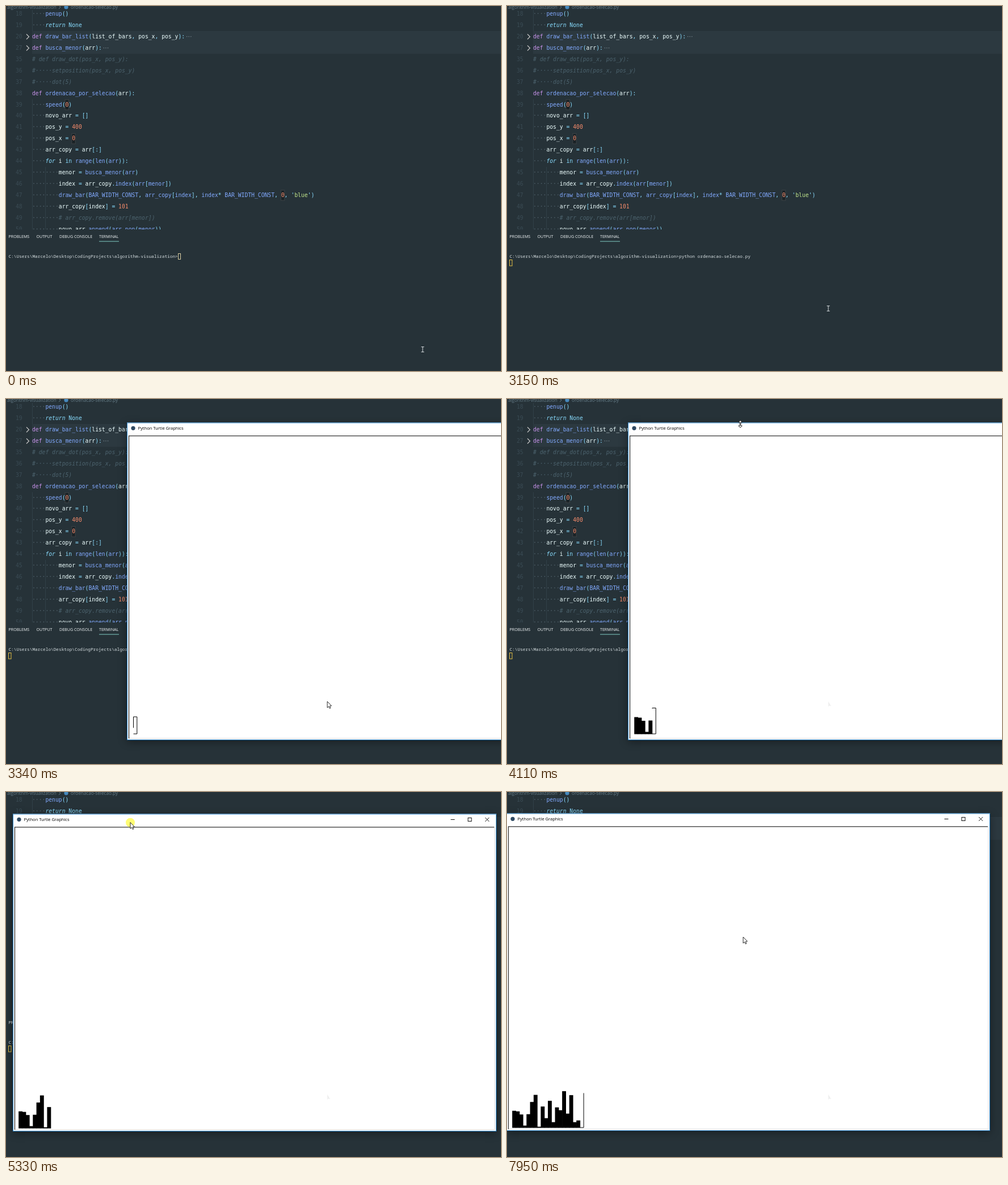
An HTML page with a canvas that plays this animation: 872 px wide and 642 px high, repeating every 8 s.

```html
<!DOCTYPE html>
<html lang="pt">
<head>
<meta charset="utf-8">
<title>Selection sort with turtle</title>
<style>
  html, body { margin: 0; width: 100%; height: 100%; overflow: hidden; background: #263238; }
  canvas { display: block; }
</style>
</head>
<body>
<canvas id="stage" width="872" height="642"></canvas>
<script>
const ctx = document.getElementById('stage').getContext('2d');
const LOOP = 8000;
const CODE_FONT = '9.72px "DejaVu Sans Mono", monospace';
const TERM_FONT = '7.77px "Noto Sans Mono", monospace';
const ui = size => `${size}px "Open Sans", "Noto Sans", sans-serif`;
const BG = '#263238', CYAN = '#89ddff', BLUE = '#82aaff', WHITE = '#eeffff', COMMENT = '#4c636e';
const COL = 5.85, ROW = 19.92, LEFT = 46, TERM_COL = 4.664;

const code = [
  [18, '    penup()'],
  [19, '    return None'],
  [20, 'def draw_bar_list(list_of_bars, pos_x, pos_y):', true],
  [27, 'def busca_menor(arr):', true],
  [35, '# def draw_dot(pos_x, pos_y):'],
  [36, '#     setposition(pos_x, pos_y)'],
  [37, '#     dot(5)'],
  [38, 'def ordenacao_por_selecao(arr):'],
  [39, '    speed(0)'],
  [40, '    novo_arr = []'],
  [41, '    pos_y = 400'],
  [42, '    pos_x = 0'],
  [43, '    arr_copy = arr[:]'],
  [44, '    for i in range(len(arr)):'],
  [45, '        menor = busca_menor(arr)'],
  [46, '        index = arr_copy.index(arr[menor])'],
  [47, "        draw_bar(BAR_WIDTH_CONST, arr_copy[index], index* BAR_WIDTH_CONST, 0, 'blue')"],
  [48, '        arr_copy[index] = 101'],
  [49, '        # arr_copy.remove(arr[menor])'],
  [50, '        novo_arr.append(arr.pop(menor))'],
];
const prompt = 'C:\\Users\\Marcelo\\Desktop\\CodingProjects\\algorithm-visualization>';
const command = 'python ordenacao-selecao.py';
const keyTimes = [900, 1170, 1340, 1410, 1590, 1680, 1770, 1970, 2090];
const TAB_KEY = 2270, ENTER = 3020;

const OPEN = 3200, GRAB = 4665, RELEASE = 6310;
const WIN_W = 852, WIN_H = 558.5;
const windowPath = [
  [GRAB, 213, 41.5], [5070, 4, 30], [5329, 4, 30], [5330, 12, 38.5], [5630, 5, 31], [5760, 5, 31],
  [5940, 1, 37], [6040, 1, 37], [6090, -1, 37.5],
];
const mousePath = [
  [40, 734, 604], [290, 566, 532], [3660, 566, 532], [3850, 538, 430], [4110, 411, 44],
  [4350, 413, 49], [4640, 420, 56.5],
];
const exitPath = [[RELEASE - 50, 206, 52.5], [6600, 290, 130], [7040, 416, 255]];

const BAR_W = 6.28, BAR_TIME = 160;
const heights = [30, 29, 23.5, 4, 24, 45.5, 58, 2, 37.5, 17, 47.5, 10, 36, 31, 64.5, 25, 57.5, 10, 13, 61.5];

const clamp = v => Math.max(0, Math.min(1, v));

function follow(path, t) {
  if (t <= path[0][0]) return path[0].slice(1);
  for (let i = 1; i < path.length; i++) {
    const [t0, x0, y0] = path[i - 1], [t1, x1, y1] = path[i];
    if (t < t1) {
      const k = (t - t0) / (t1 - t0);
      return [x0 + (x1 - x0) * k, y0 + (y1 - y0) * k];
    }
  }
  return path[path.length - 1].slice(1);
}

function text(str, x, y, color, font) {
  if (font) ctx.font = font;
  ctx.fillStyle = color;
  ctx.fillText(str, x, y);
}

function rect(x, y, w, h, color) {
  ctx.fillStyle = color;
  ctx.fillRect(x, y, w, h);
}

function box(x, y, w, h, color) {
  ctx.strokeStyle = color;
  ctx.lineWidth = 1;
  ctx.strokeRect(x, y, w, h);
}

function disc(x, y, r, color) {
  ctx.fillStyle = color;
  ctx.beginPath();
  ctx.arc(x, y, r, 0, 7);
  ctx.fill();
}

function line(points, color, width = 1) {
  ctx.strokeStyle = color;
  ctx.lineWidth = width;
  ctx.beginPath();
  points.forEach(([x, y]) => ctx.lineTo(x, y));
  ctx.stroke();
}

function codeLine(src, y) {
  const isDef = src.startsWith('def');
  const put = (str, col, color, italic) =>
    text(str, LEFT + col * COL, y, color, (italic ? 'italic ' : '') + CODE_FONT);
  let depth = 0;
  for (const m of src.matchAll(/^ +|#.*|'\w*'|\w+|[^\w\s]/g)) {
    const tok = m[0], col = m.index, next = src[col + tok.length];
    if (tok[0] === ' ') put('·'.repeat(tok.length), col, '#53656e');
    else if (tok[0] === '#') put(tok.replace(/ {2,}/, s => '·'.repeat(s.length)), col, COMMENT, true);
    else if (tok[0] === "'") {
      put("'    '", col, CYAN);
      put(tok.slice(1, -1), col + 1, '#c3e88d');
    }
    else if (/^\d/.test(tok)) {
      if (tok === '0') {
        const x = LEFT + col * COL - .5;
        rect(x, y - 12, 6.5, 18, 'rgba(0,0,0,.3)');
        box(x, y - 12, 6.5, 18, '#3c4346');
      }
      put(tok, col, '#f78c6c');
    }
    else if (tok === 'def') put(tok, col, '#c792ea');
    else if (/^(for|return)$/.test(tok)) put(tok, col, CYAN, true);
    else if (/^(in|None)$/.test(tok) || /\W/.test(tok)) put(tok, col, CYAN);
    else put(tok, col, next === '(' || (depth && !isDef) ? BLUE : WHITE);
    depth += (tok === '(') - (tok === ')');
  }
}

function drawEditor() {
  rect(0, 0, 872, 642, BG);
  text('algorithm-visualization', 2, 4.8, '#647b86', ui(8.2));
  text('ordenacao-selecao.py', 114, 4.8, '#647b86');
  line([[93, -1], [96, 2], [93, 5]], '#647b86');
  disc(106, 2, 3.6, '#4689bd');

  ctx.save();
  ctx.beginPath();
  ctx.rect(0, 7, 872, 386);
  ctx.clip();
  rect(LEFT, 44, 826, 40, '#2c3940');
  rect(46, 4, 1, 40, '#314048');
  rect(46, 164, 1, 230, '#314048');
  rect(69, 283, 1, 110, '#314048');
  code.forEach(([number, src, folded], i) => {
    const y = 17.2 + i * ROW;
    text(number, 17, y, '#3a4b54', CODE_FONT);
    codeLine(src, y);
    if (!folded) return;
    line([[36, y - 7.5], [40.5, y - 3], [36, y + 1.5]], '#c5c5c5', 1.2);
    for (let d = 0; d < 3; d++) disc(LEFT + src.length * COL + 3.5 + d * 3.6, y - 3.2, .75, '#7a8a92');
  });
  ctx.restore();

  ctx.font = ui(7.1);
  [['PROBLEMS', 4.5], ['OUTPUT', 53.5], ['DEBUG CONSOLE', 94], ['TERMINAL', 164]]
    .forEach(([label, x]) => text(label, x, 408.4, '#f4f8f9'));
  rect(164, 413.5, 35, 1, '#80cbc4');
}

function drawTerminal(t) {
  const typed = t >= TAB_KEY ? command.length : keyTimes.filter(k => t >= k).length;
  text(prompt, 4.5, 442.8, '#d5dde0', TERM_FONT);
  const start = 4.5 + prompt.length * TERM_COL;
  text(command.slice(0, typed), start, 442.8, '#d5dde0');
  const color = t < 50 ? '#d6cba0' : '#e3bf45';
  if (t < ENTER) box(Math.round(start + typed * TERM_COL) + .5, 435.5, 4, 10, color);
  else box(4.5, 446.5, 4.5, 10.5, color);
}

function drawBars(t, x, base) {
  const done = (Math.min(t, 4638) - 3198 + Math.max(0, t - 6278)) / BAR_TIME;
  const count = Math.floor(done), q = done - count;
  heights.slice(0, count).forEach((h, i) => rect(x + i * BAR_W - .3, base - h, BAR_W + .6, h, '#000'));
  if (q < .01 || count >= heights.length) return;

  // The pen traces bottom, right, top and left before the bar is filled.
  const l = x + count * BAR_W, r = l + BAR_W, top = base - heights[count];
  const corners = [[l, base], [r, base], [r, top], [l, top], [l, base]];
  const ends = [0, .2, .46, .7, 1];
  const trace = [corners[0]];
  for (let s = 1; s < 5 && q > ends[s - 1]; s++) {
    const k = clamp((q - ends[s - 1]) / (ends[s] - ends[s - 1]));
    const [x0, y0] = corners[s - 1], [x1, y1] = corners[s];
    trace.push([x0 + (x1 - x0) * k, y0 + (y1 - y0) * k]);
  }
  line(trace.map(([px, py]) => [px, py - .5]), '#000');
}

function drawWindow(t) {
  if (t < OPEN) return;
  const [x, y] = follow(windowPath, t);
  const h = WIN_H - 10 * clamp((3340 - t) / 60);
  ctx.save();
  ctx.globalAlpha = clamp((t - OPEN) / 110);
  ctx.save();
  if (t > 3310) {
    ctx.shadowColor = 'rgba(0,0,0,.4)';
    ctx.shadowBlur = 14;
    ctx.shadowOffsetY = 3;
  }
  rect(x, y, WIN_W, h, '#fff');
  ctx.restore();
  box(x + .5, y + .5, WIN_W - 1, h - 1, '#2a86cc');

  disc(x + 11, y + 9.8, 3.6, '#2f4a63');
  text('Python Turtle Graphics', x + 19.5, y + 12.6, '#000', ui(7.55));
  const cy = y + 10;
  line([[x + 771.5, cy], [x + 778.5, cy]], '#111');
  box(x + 802, cy - 3, 6, 6, '#111');
  line([[x + 832.2, cy - 3.5], [x + 839.2, cy + 3.5]], '#111');
  line([[x + 839.2, cy - 3.5], [x + 832.2, cy + 3.5]], '#111');

  rect(x + WIN_W - 4, y + 23, 2, h - 26, '#ececec');
  rect(x + 3, y + h - 4, WIN_W - 6, 2, '#ececec');
  line([[x + 3.5, y + h - 3], [x + 3.5, y + 23.3], [x + WIN_W - 4, y + 23.3]], '#303030', 1.3);

  const moved = t >= GRAB;
  drawBars(t, x + (moved ? 10.5 : 11.5), y + h - (moved ? 5.3 : 10.5));
  ctx.restore();
  if (t > 3700) shape(566, 532, [[0, 0], [0, 9], [2, 7.5], [5, 8]], '#efefef');
}

function shape(x, y, points, fill, stroke) {
  ctx.beginPath();
  points.forEach(([px, py]) => ctx.lineTo(x + px, y + py));
  ctx.closePath();
  ctx.fillStyle = fill;
  ctx.fill();
  if (!stroke) return;
  ctx.strokeStyle = stroke;
  ctx.lineWidth = .9;
  ctx.stroke();
}

const ARROW = [[0, 0], [0, 11], [2.5, 8.7], [4.2, 12.3], [5.9, 11.5], [4.3, 8], [7.4, 7.7]];
const RESIZE = [[0, -6.5], [3.2, -3], [.8, -3], [.8, 3], [3.2, 3], [0, 6.5],
  [-3.2, 3], [-.8, 3], [-.8, -3], [-3.2, -3]];

function drawMouse(t) {
  let [x, y] = follow(mousePath, t);
  if (t >= RELEASE) [x, y] = follow(exitPath, t);
  else if (t >= GRAB) {
    const [wx, wy] = follow(windowPath, t);
    [x, y] = [wx + 207, wy + 15];
    disc(x, y + .3, 8, 'rgba(255,250,0,.55)');
  }
  if (t < 3220) {
    line([[x - 2.5, y - 4.5], [x + 2.5, y - 4.5]], '#d8dde0');
    line([[x, y - 4.5], [x, y + 4.5]], '#d8dde0');
    line([[x - 2.5, y + 4.5], [x + 2.5, y + 4.5]], '#d8dde0');
  }
  else if (t > 4080 && t < 4300) shape(x, y, RESIZE, '#fff', '#111');
  else shape(x, y, ARROW, '#fff', '#111');
}

function draw() {
  const t = performance.now() % LOOP;
  drawEditor();
  drawTerminal(t);
  drawWindow(t);
  drawMouse(t);
  requestAnimationFrame(draw);
}
draw();
</script>
</body>
</html>
```
